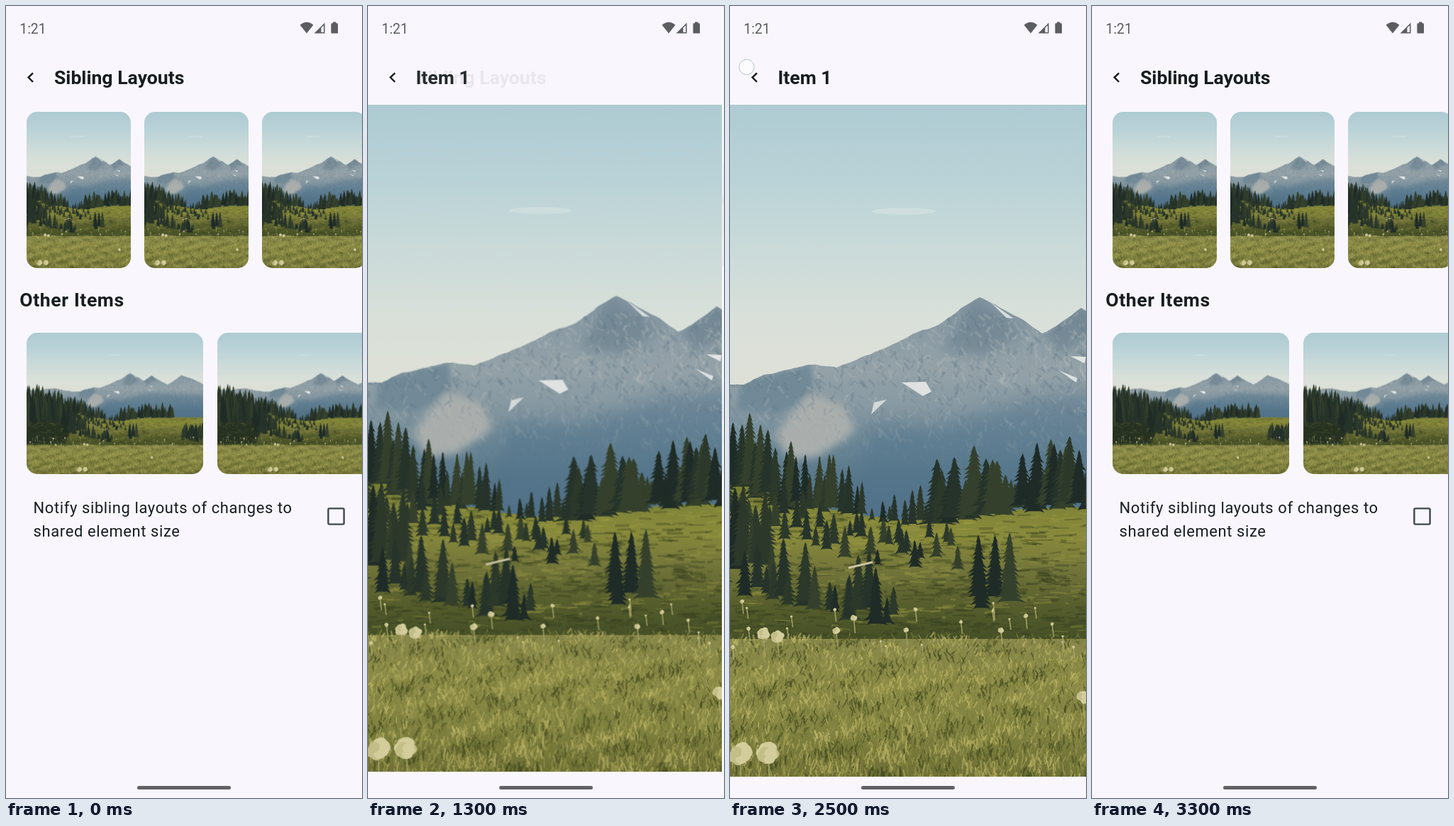
An HTML page with a canvas that plays this animation: 502x1115 px, repeating every 3400 ms.

```html
<!DOCTYPE html>
<html lang="en">
<head>
<meta charset="utf-8">
<title>Sibling Layouts</title>
<style>
  html, body { margin: 0; width: 100%; height: 100%; overflow: hidden; background: #f9f7fd; }
  #stage { position: relative; width: 502px; height: 1115px; overflow: hidden; background: #f9f7fd; }
  .layer, .layer svg { position: absolute; inset: 0; }
  canvas { position: absolute; border-radius: 15px; }
  svg { width: 502px; height: 1115px; font-family: Roboto, sans-serif; fill: #171d1e; }
  .title { font-size: 26.6px; font-weight: 700; }
  .spaced { letter-spacing: .61px; }
  .body { font-size: 21.96px; }
  .clock { font-size: 19.5px; fill: #5b5d60; }
  .line { fill: none; stroke-width: 2.4; }
</style>
</head>
<body>
<div id="stage">
  <div id="list" class="layer">
    <svg viewBox="0 0 502 1115">
      <text class="title" x="68" y="109.5">Sibling Layouts</text>
      <text class="title spaced" x="19.3" y="423.3">Other Items</text>
      <text class="body spaced" x="38.6" y="714">Notify sibling layouts of changes to</text>
      <text class="body spaced" x="38.6" y="747.2">shared element size</text>
      <rect class="line" x="454.4" y="707.4" width="22.2" height="22.2" rx="1.6" stroke="#3f484c"/>
    </svg>
  </div>
  <div id="detail" class="layer">
    <svg viewBox="0 0 502 1115"><text class="title" x="67.6" y="109.5">Item 1</text></svg>
  </div>
  <canvas id="hero"></canvas>
  <div class="layer">
    <svg viewBox="0 0 502 1115">
      <text class="clock" x="19.2" y="38.5">1:21</text>
      <g fill="#5b5d60">
        <path d="M424 38.5 414.6 26.8Q424 18.8 433.4 26.8Z"/>
        <path d="M449.5 23.5V38.5H434.5ZM448 27.2 444.4 30.8V37H448Z" fill-rule="evenodd"/>
        <path d="M461 22.6h4.4v1.6h1.4q1.2 0 1.2 1.2v12q0 1.2-1.2 1.2h-7.2q-1.2 0-1.2-1.2v-12q0-1.2 1.2-1.2h1.4z"/>
        <rect x="185" y="1098" width="132" height="5" rx="2.5" fill="#626266"/>
      </g>
      <path class="line" d="M38 94.4 31.6 100.6 38 106.8" stroke="#121718"/>
      <circle id="tap" r="10.7"/>
    </svg>
  </div>
</div>
<script>
const $ = id => document.getElementById(id);
const W = 1178, H = 946, LEFT = -338, RIGHT = 840;

let seed = 7;
const rnd = () => (seed = (seed * 16807) % 2147483647) / 2147483647;
const between = (a, b) => a + rnd() * (b - a);
const pick = list => list[Math.floor(rnd() * list.length)];
const clamp = x => Math.min(1, Math.max(0, x));

// Landscape, drawn once; x = 0 is the left edge of the full-screen crop.
const photo = document.createElement('canvas');
photo.width = W;
photo.height = H;
const g = photo.getContext('2d');
g.translate(-LEFT, 0);

function shade(y0, y1, ...colors) {
  const fill = g.createLinearGradient(0, y0, 0, y1);
  colors.forEach((c, i) => fill.addColorStop(i / (colors.length - 1), c));
  return fill;
}

function shape(points, fill, blur = 0) {
  const path = new Path2D('M' + points + 'Z');
  g.filter = blur ? `blur(${blur}px)` : 'none';
  g.fillStyle = fill;
  g.fill(path);
  g.filter = 'none';
  return path;
}

function blob(x, y, rx, ry, fill) {
  g.fillStyle = fill;
  g.beginPath();
  g.ellipse(x, y, rx, ry, 0, 0, 7);
  g.fill();
}

function stroke(x, y, dx, dy, width, color) {
  g.strokeStyle = color;
  g.lineWidth = width;
  g.beginPath();
  g.moveTo(x, y);
  g.lineTo(x + dx, y + dy);
  g.stroke();
}

// Midpoint displacement between two points of a ridge.
function rough([x0, y0], [x1, y1]) {
  if (x1 - x0 < 7) return [[x1, y1]];
  const mid = [(x0 + x1) / 2, (y0 + y1) / 2 + between(-.05, .05) * (x1 - x0)];
  return [...rough([x0, y0], mid), ...rough(mid, [x1, y1])];
}

function drawSky() {
  g.fillStyle = shade(0, 400, '#aecbd3', '#b9d2d7', '#c9dad9', '#d9e0d9', '#dee0d7');
  g.fillRect(LEFT, 0, W, H);
  blob(245, 150, 45, 5, 'rgba(230,235,232,.35)');
}

function drawMountains() {
  const peaks = [[LEFT, 385], [20, 394], [48, 380], [115, 366], [150, 370], [215, 344], [300, 306],
    [352, 271], [440, 322], [495, 286], [600, 346], [695, 284], [RIGHT, 345]];
  const ridge = [peaks[0], ...peaks.slice(1).flatMap((p, i) => rough(peaks[i], p))];
  const range = shape([...ridge, [RIGHT, 620], [LEFT, 620]].join(' '),
    shade(270, 580, '#8295a1', '#8a9ba4', '#94a2a8', '#8799a2', '#6b8796', '#577689', '#4d6e83'));
  g.save();
  g.clip(range);
  shape('15 390 114 366 118 408 65 436 10 430', '#728a97', 3);
  shape('345 275 415 320 360 355 300 345', 'rgba(100,124,139,.55)', 8);
  shape('445 322 495 286 540 310 465 350', 'rgba(100,124,139,.55)', 6);
  shape('112 405 165 425 176 460 125 495 85 500 62 465', '#a9aeac', 6);
  shape('200 450 300 455 400 420 500 405 840 420 840 620 150 620', 'rgba(82,116,139,.5)', 12);
  for (let i = 0; i < 2200; i++) {
    const y = between(290, 500), fade = clamp((510 - y) / 120);
    const lit = Math.sin(y / 23 + Math.random.length + between(-1, 1) * 2) > 0;
    stroke(between(-60, RIGHT), y, between(-7, 11), between(3, 12), between(1, 4),
      lit ? `rgba(186,190,188,${.24 * fade})` : `rgba(84,110,128,${.22 * fade})`);
  }
  shape('242 391 276 390 284 404 272 410', '#dfe2e1');
  shape('203 419 221 415 199 436', '#d3d8d9');
  shape('366 277 400 301 390 300', '#d8dcdc');
  shape('480 354 502 355 500 364', '#e3e5e3');
  shape('464 374 490 385 488 391', '#dce0e0');
  g.restore();
}

// Far edge of the meadow: a slope on the left that levels out.
const hill = x => 512 + 72 * Math.sqrt(clamp(x / 230)) - 18 * clamp((x - 300) / 150);

function drawMeadow() {
  const edge = [];
  for (let x = LEFT; x <= RIGHT; x += 6) edge.push([x, hill(x) + between(-2, 2)]);
  shape([...edge, [RIGHT, H], [LEFT, H]].join(' '),
    shade(510, 750, '#697333', '#7d8237', '#888a3b', '#73763a', '#585f2d', '#465027'));
  shape('-338 470-130 470-20 540-35 640-80 740-338 745', '#263122', 5);
  for (let i = 0; i < 2200; i++) {
    const x = between(LEFT, RIGHT), y = between(hill(x) + 6, 748);
    const lit = Math.sin(y / 9 + x / 70) + between(-1.5, 1.5) > (y - 600) / 120;
    stroke(x, y, between(4, 26), between(-2, 2), between(1, 4),
      lit ? 'rgba(158,156,68,.32)' : 'rgba(52,62,30,.36)');
  }
}

function conifer(x, base, h, w) {
  const n = Math.max(5, Math.round(h / 6));
  g.fillStyle = pick(['#1f2b26', '#26332a', '#2c382a', '#34402c']);
  g.beginPath();
  g.moveTo(x, base - h);
  for (const side of [1, -1]) {
    for (let k = 1; k <= n; k++) {
      const i = side > 0 ? k : n + 1 - k;
      const half = side * w / 2 * Math.pow(i / n, .75);
      const y = base - h + h * i / n;
      const tip = [x + half * between(.7, 1.25), y];
      const notch = [x + half * .5, y - 2];
      for (const p of side > 0 ? [tip, notch] : [notch, tip]) g.lineTo(...p);
    }
  }
  g.fill();
}

// A group of trees whose feet lie `drop` below the meadow edge.
function stand(count, [x0, x1], [drop0, drop1], [h0, h1], girth = .32) {
  for (let i = 0; i < count; i++) {
    const x = x0 + (x1 - x0) * (i + rnd()) / count, h = between(h0, h1);
    conifer(x, hill(x) + between(drop0, drop1), h, h * girth + 4);
  }
}

function drawTrees() {
  for (let i = 0; i < 110; i++) {
    const x = between(LEFT, -8);
    const top = 340 + Math.max(0, x + 190) * .42 + between(0, 30);
    conifer(x, top + 110 + i * 1.3, 110 + i * .4, between(30, 48));
  }
  stand(9, [0, 90], [0, 22], [80, 110]);
  stand(13, [92, 190], [-2, 10], [40, 78], .26);
  stand(8, [195, 285], [2, 10], [14, 58]);
  stand(11, [285, 392], [0, 8], [55, 105], .5);
  stand(46, [395, 640], [-6, 6], [30, 100], .4);
  stand(30, [700, 850], [120, 165], [50, 110]);
  stand(34, [0, 325], [22, 75], [18, 50], .4);
  stand(7, [0, 62], [95, 135], [60, 118]);
  stand(18, [20, 240], [125, 160], [35, 85], .36);
  stand(4, [335, 400], [115, 145], [45, 112], .36);
  stroke(167, 652, 34, -8, 3, '#c9c4a0');
}

function drawGrass() {
  g.fillStyle = shade(745, H, '#85864a', '#8b8b47', '#818341', '#6d6f36');
  g.fillRect(LEFT, 752, W, H);
  const count = 11000;
  for (let i = 0; i < count; i++) {
    const x = between(LEFT, RIGHT), near = i / count, y = 750 + near * 210;
    const tone = Math.sin(x / 17 + 2 * Math.sin(y / 13)) + Math.sin(y / 8 + x / 41) + between(-2, 2);
    const color = tone > 1.2 ? '190,181,104' : tone > 0 ? '160,157,80' : tone > -1.3 ? '118,122,54' : '66,73,32';
    stroke(x, y, between(-5, 6), -between(4, 8 + near * 10), between(.8, 2.6), `rgba(${color},.6)`);
  }
}

function flower(x, y, r) {
  stroke(x, y, 2, r * 2 + 12, 1.5, '#a5a468');
  for (let i = 0; i < 14; i++) {
    const a = i * 2.4, d = r * .62 * Math.sqrt(rnd());
    blob(x + d * Math.cos(a), y + d * Math.sin(a), r * .48, r * .45, i % 3 ? '#d3cd9c' : '#c3bd87');
  }
}

function drawFlowers() {
  for (let i = 0; i < 75; i++) flower(between(LEFT, RIGHT), between(695, 770), 1.5 + 5 * rnd() ** 3);
  for (const x of [14, 54]) flower(x, 914, 17);
  for (const x of [47, 67, 498]) flower(x, 735 + x / 5, 9);
}

[drawSky, drawMountains, drawMeadow, drawTrees, drawGrass, drawFlowers].forEach(draw => draw());

// Centre-crops the landscape into a canvas at the given box.
function place(canvas, x, y, w, h) {
  Object.assign(canvas.style, { left: x + 'px', top: y + 'px', width: w + 'px', height: h + 'px' });
  canvas.width = Math.round(w);
  canvas.height = Math.round(h);
  const scale = Math.max(w / W, h / H), sw = w / scale, sh = h / scale;
  const c = canvas.getContext('2d');
  c.imageSmoothingQuality = 'high';
  c.drawImage(photo, (W - sw) / 2, (H - sh) / 2, sw, sh, 0, 0, canvas.width, canvas.height);
}

function row(x, y, w, h) {
  for (; x < 502; x += w + 19.5) place($('list').appendChild(document.createElement('canvas')), x, y, w, h);
}

const CARD = [29.3, 149.3, 146.5, 219.7], FULL = [0, 139, 502, 946];
row(195.3, ...CARD.slice(1));
row(29.3, 459.7, 249, 199.8);

// Timing in ms: critically damped spring for the bounds, eased fade for the screens.
const LOOP = 3400, STEP = 100, FADE = 700;
const OPEN = { tap: 800, spring: 970, fade: 815 };
const CLOSE = { tap: 2500, spring: 2590, fade: 2665 };

function spring(ms) {
  const d = Math.max(0, ms) * .02;
  return 1 - (1 + d) * Math.exp(-d);
}

// cubic-bezier(.4, 0, .2, 1)
function ease(x) {
  if (x <= 0) return 0;
  if (x >= 1) return 1;
  let lo = 0, hi = 1, s;
  for (let i = 0; i < 24; i++) {
    s = (lo + hi) / 2;
    const u = 1 - s;
    if (1.2 * u * u * s + .6 * u * s * s + s * s * s < x) lo = s; else hi = s;
  }
  return s * s * (3 - 2 * s);
}

function showTap(x, y, fill, line) {
  const attrs = { cx: x, cy: y, fill, stroke: line, visibility: 'visible' };
  for (const name in attrs) $('tap').setAttribute(name, attrs[name]);
}

function render(t) {
  const grow = spring(t - OPEN.spring) - spring(t - CLOSE.spring);
  const fade = ease((t - OPEN.fade) / FADE) - ease((t - CLOSE.fade) / FADE);
  place($('hero'), ...CARD.map((a, i) => a + (FULL[i] - a) * grow));
  $('hero').style.borderRadius = 15 * (1 - grow) + 'px';
  $('list').style.opacity = 1 - fade;
  $('detail').style.opacity = fade;
  if (t === OPEN.tap) showTap(105.5, 285, 'rgba(208,222,230,.75)', 'rgba(170,190,198,.8)');
  else if (t === CLOSE.tap) showTap(23.5, 86, 'rgba(252,252,254,.8)', '#b4c4c8');
  else $('tap').setAttribute('visibility', 'hidden');
}

let start, shown;
function tick(now) {
  start ??= now;
  const t = Math.floor((now - start) % LOOP / STEP) * STEP;
  if (t !== shown) render(shown = t);
  requestAnimationFrame(tick);
}
render(0);
requestAnimationFrame(tick);
</script>
</body>
</html>
```
